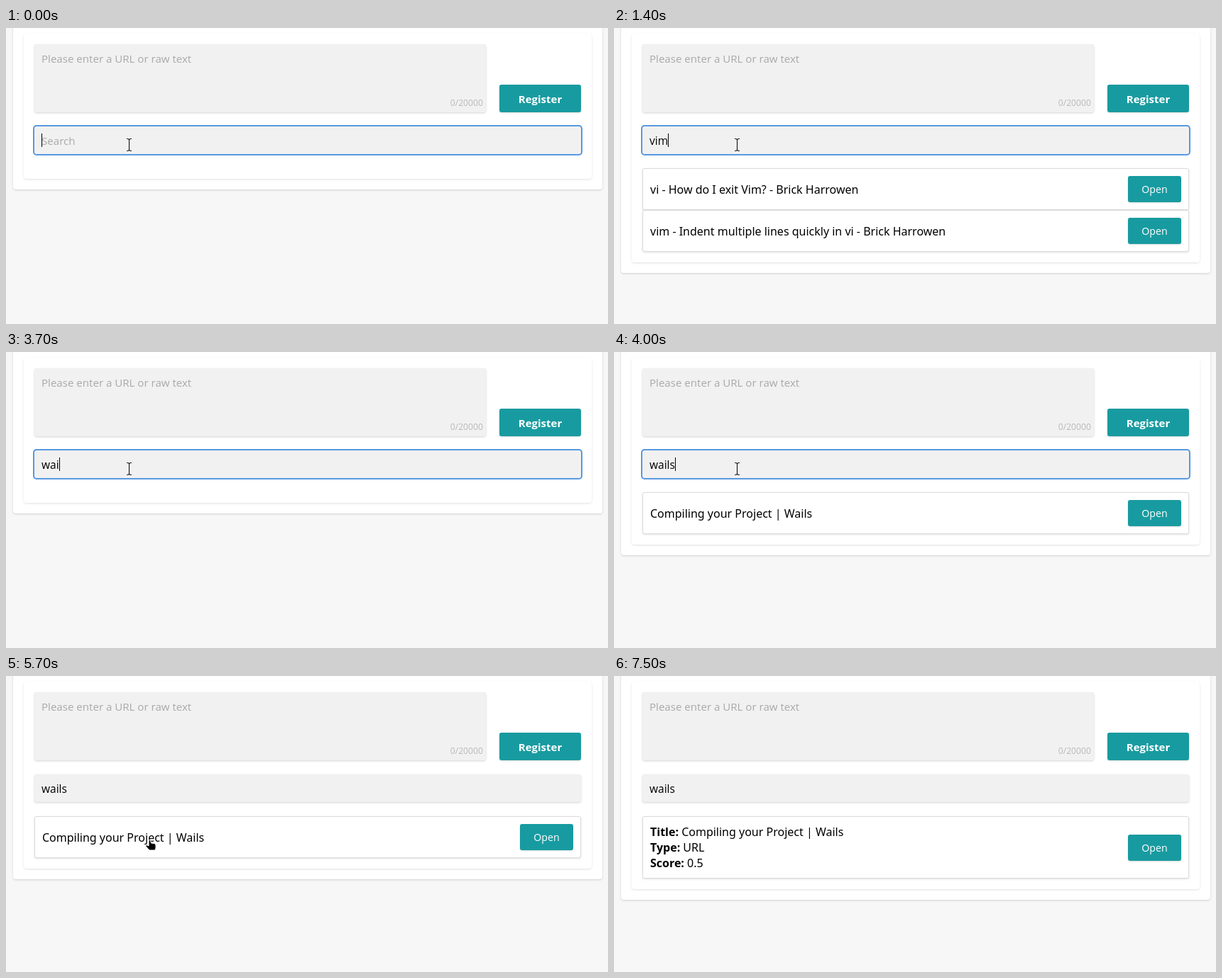
Write an HTML page that moves like this. It is 848 by 418 pixels and loops after 8100 ms.

```html
<!DOCTYPE html>
<html lang="en">
<head>
<meta charset="utf-8">
<title>Search demo</title>
<style>
* { box-sizing: border-box; }
html, body { margin: 0; width: 100%; height: 100%; overflow: hidden; background: #f7f7f7; }
body { font: 16px/22px "Noto Sans", sans-serif; color: #000; position: relative; }
.card { position: absolute; background: #fff; border-radius: 4px; box-shadow: 0 1px 3px rgba(0,0,0,.16); }
#outer { left: 10px; top: -10px; width: 830px; }
#inner { left: 25px; top: 8px; width: 800px; box-shadow: 0 1px 3px rgba(0,0,0,.12); }
.ui { position: absolute; font-family: "Open Sans", sans-serif; }
.box { background: #f1f1f1; border-radius: 3px; box-shadow: 0 1px 3px rgba(0,0,0,.18); }
.hint { color: #a9a9a9; font-size: 15.1px; white-space: pre; }
.btn { background: #189ba0; color: #fff; border-radius: 3px; text-align: center; box-shadow: 0 1px 2px rgba(0,0,0,.15); }
#area { left: 40px; top: 23px; width: 636px; height: 96px; }
#count { right: 4px; bottom: 2px; font-size: 12.2px; color: #b9b9b9; }
#register { left: 695px; top: 80px; width: 115px; height: 39px; font-size: 15px; font-weight: 700; line-height: 40px; }
#search { left: 40px; top: 139px; width: 770px; height: 39px; }
#search.focus { box-shadow: 0 0 0 2px #5898e0; }
#typed { left: 10px; top: 9px; height: 22px; font-size: 15.5px; white-space: pre; }
#caret { position: absolute; left: 100%; top: 1px; width: 1px; height: 19px; background: #000; }
#list { position: absolute; left: 40px; top: 198px; width: 770px; }
.item { display: flex; align-items: center; justify-content: space-between; padding: 10px; background: #fff;
  border: 1px solid #dcdcdc; border-radius: 3px; box-shadow: 0 1px 3px rgba(0,0,0,.13); }
.item .btn { width: 75px; height: 37px; font: 14.2px/37px "Open Sans", sans-serif; }
svg { position: absolute; left: 0; top: 0; width: 100%; height: 100%; }
</style>
</head>
<body>
<div id="outer" class="card"></div>
<div id="inner" class="card"></div>
<div id="area" class="ui box">
  <div class="ui hint" style="left:10px;top:9px">Please enter a URL or raw text</div>
  <div id="count" class="ui">0/20000</div>
</div>
<div id="register" class="ui btn">Register</div>
<div id="search" class="ui box">
  <div id="hint" class="ui hint" style="left:10px;top:9px">Search</div>
  <div id="typed" class="ui"><span id="word"></span><i id="caret"></i></div>
</div>
<div id="list"></div>
<svg>
  <g id="beam" fill="none">
    <path d="M-3 -8.5H-1L.5 -7.5L2 -8.5H4M-3 8.5H-1L.5 7.5L2 8.5H4M.5 -7.5V7.5" stroke="#fff" stroke-width="3"/>
    <path d="M-3 -8.5H-1L.5 -7.5L2 -8.5H4M-3 8.5H-1L.5 7.5L2 8.5H4M.5 -7.5V7.5" stroke="#111" stroke-width="1.2"/>
  </g>
  <path id="arrow" d="M0 0V14.5L3.3 11.5L6 17.3L8.5 16.2L5.9 10.5H10.4Z" fill="#000" stroke="#fff"/>
  <path id="hand" d="M-1 0Q.5 -1 1.5 .5L2.5 4L7 4.5Q9 5 9 7V11L8 14H0L-5 8.5Q-5.5 6.5 -3.5 6.7L-1 8Z" fill="#000" stroke="#fff"/>
</svg>
<script>
const $ = id => document.getElementById(id);
const LOOP = 8100;

// [start, value]: the last entry that has begun applies
const at = (steps, t) => steps.filter(s => s[0] <= t).pop()[1];

const words = [[0, ""], [1100, "v"], [1300, "vi"], [1400, "vim"], [2600, ""], [3400, "w"],
  [3500, "wa"], [3700, "wai"], [3800, "wail"], [3900, "wails"]];
const carets = [[0, 1], [100, 0], [700, 1], [1900, 0], [2500, 1], [3200, 0], [3400, 1], [4500, 0]];

const item = html => `<div class="item"><div>${html}</div><div class="btn">Open</div></div>`;
const title = "Compiling your Project | Wails";
const lists = [
  [0, ""],
  [1400, item("vi - How do I exit Vim? - Brick Harrowen") +
         item("vim - Indent multiple lines quickly in vi - Brick Harrowen")],
  [3600, ""],
  [4000, item(title)],
  [6200, item(`<b>Title:</b> ${title}<br><b>Type:</b> URL<br><b>Score:</b> 0.5`)]
];

// pointer position, sampled every 100 ms
function pointer(t) {
  const step = Math.floor(t / 100);
  const mix = (a, b, k) => Math.round(a + (b - a) * k);
  if (t < 4500) return ["beam", 173, 165];
  if (t < 5600) {
    const k = Math.min(1, (step - 44) / 5), e = k * k * (3 - 2 * k);
    const y = mix(165, 240, e);
    return [y < 179 ? "beam" : "arrow", mix(173, 201, e), y];
  }
  if (t < 5700) return ["arrow", 202, 235];
  if (t < 7200) return ["hand", 202, 232];
  if (t < 7500) {
    const k = (step - 71) / 3, e = k ** 1.5;
    const y = mix(232, 2, e);
    return [y > 198 ? "hand" : y > 23 && y < 120 ? "beam" : "arrow", mix(202, 57, e), y];
  }
  return ["none", 0, 0];
}

let shown = null;
function draw(now) {
  const t = now % LOOP;
  const word = at(words, t), list = at(lists, t);
  $("word").textContent = word;
  $("hint").hidden = word !== "";
  $("caret").hidden = !at(carets, t);
  $("search").classList.toggle("focus", t < 5100);
  if (list !== shown) {
    $("list").innerHTML = shown = list;
    const end = 198 + $("list").offsetHeight;
    $("inner").style.height = end + 15 - 8 + "px";
    $("outer").style.height = end + 30 + 10 + "px";
  }
  const [kind, x, y] = pointer(t);
  for (const id of ["beam", "arrow", "hand"]) {
    $(id).style.display = id === kind ? "" : "none";
    $(id).setAttribute("transform", `translate(${x} ${y})`);
  }
  requestAnimationFrame(draw);
}
draw(0);
</script>
</body>
</html>
```
